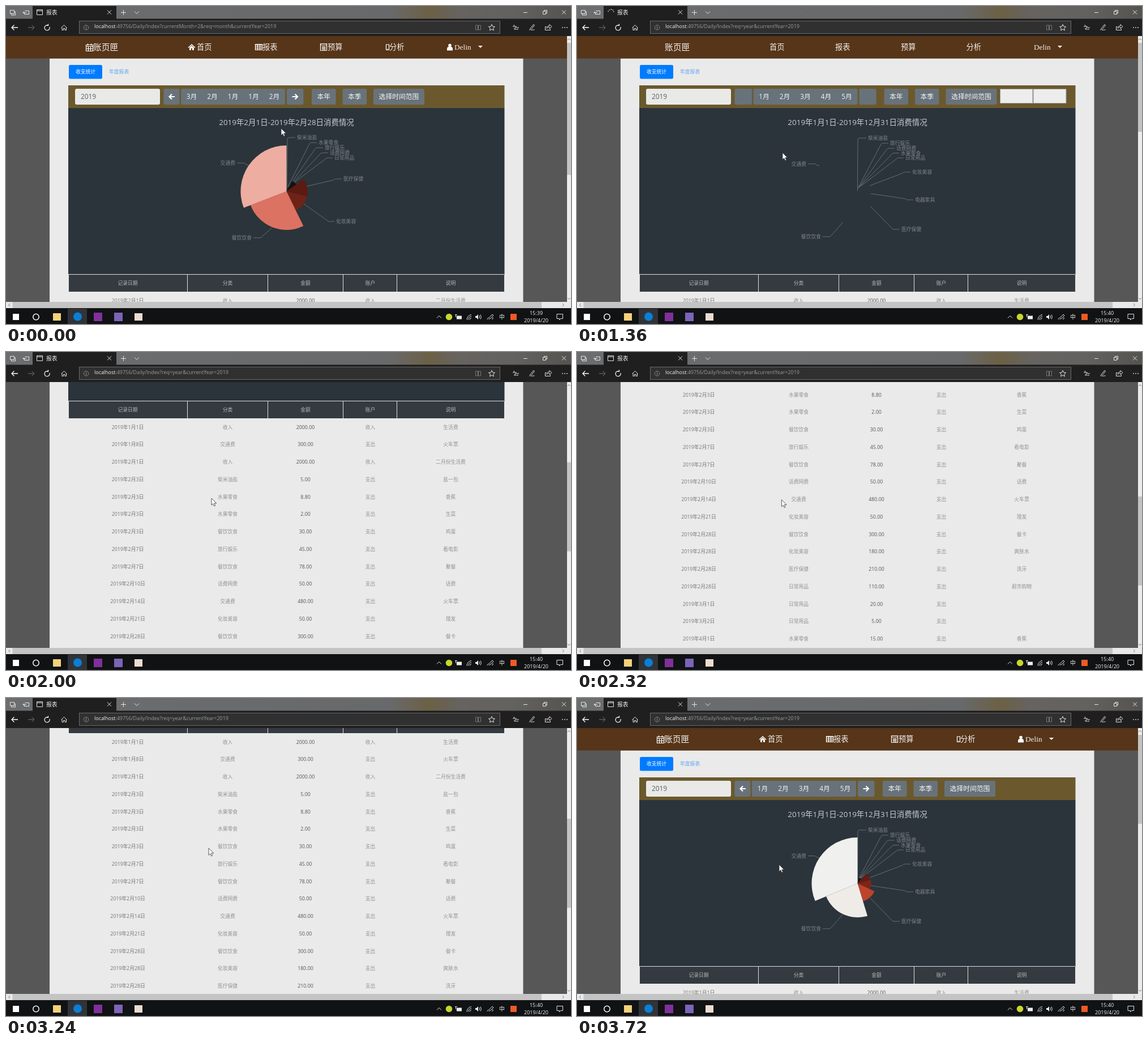
Recreate the animation shown at these times as an HTML page. Size 998x561 px, loop 3.76 s.

```html
<!DOCTYPE html>
<html lang="zh-CN">
<head>
<meta charset="utf-8">
<style>
html, body { margin: 0; width: 100%; height: 100%; overflow: hidden; background: #575757; }
svg { display: block; width: 998px; height: 561px; }
text { font-family: "Open Sans", "Noto Sans", "Noto Sans CJK SC", "Noto Sans CJK", sans-serif; white-space: pre; }
.serif { font-family: "Liberation Serif", serif; }
.line { fill: none; stroke: #e4e4e4; stroke-width: 1; }
</style>
</head>
<body>
<svg id="stage" viewBox="0 0 998 561"></svg>
<script>
const LOOP = 3760;
const stage = document.getElementById('stage');

const rect = (x, y, w, h, fill, rx = 0, extra = '') =>
  `<rect x="${x}" y="${y}" width="${w}" height="${h}" fill="${fill}" rx="${rx}" ${extra}/>`;
const circle = (x, y, r, fill, extra = '') => `<circle cx="${x}" cy="${y}" r="${r}" fill="${fill}" ${extra}/>`;
const line = (d, extra = '') => `<path class="line" d="${d}" ${extra}/>`;
const shape = (d, fill = '#fff') => `<path d="${d}" fill="${fill}"/>`;
const text = (x, y, s, size, fill, anchor = 'start', extra = '') =>
  `<text x="${x}" y="${y + size * .36}" font-size="${size}" fill="${fill}" text-anchor="${anchor}" ${extra}>${s.replace(/&/g, '&amp;')}</text>`;
const mid = (x, y, s, size, fill) => text(x, y, s, size, fill, 'middle');
const group = (id, body, extra = '') => `<g id="${id}" ${extra}>${body}</g>`;

// Table data: month/day, category, amount, note
const records = `1/1 收入 2000.00 生活费
1/8 交通费 300.00 火车票
2/1 收入 2000.00 二月份生活费
2/3 柴米油盐 5.00 盐一包
2/3 水果零食 8.80 香蕉
2/3 水果零食 2.00 生菜
2/3 餐饮饮食 30.00 鸡蛋
2/7 旅行娱乐 45.00 看电影
2/7 餐饮饮食 78.00 聚餐
2/10 话费网费 50.00 话费
2/14 交通费 480.00 火车票
2/21 化妆美容 50.00 理发
2/28 餐饮饮食 300.00 餐卡
2/28 化妆美容 180.00 爽肤水
2/28 医疗保健 210.00 洗牙
2/28 日常用品 110.00 超市购物
3/1 日常用品 20.00
3/2 日常用品 5.00
4/1 水果零食 15.00 香蕉
4/3 交通费 10.00 打车
4/7 收入 2000.00 生活费
4/7 话费网费 20.00 小手机话费
4/10 日常用品 17.80 湿巾
4/11 电器家具 230.00 吹风
4/11 医疗保健 116.00 眼药水
4/15 水果零食 34.00
4/18 餐饮饮食 100.00 请同学聚餐`.split('\n').map(r => r.split(' '));

const edges = [110, 320, 462, 595, 690, 880];
const centers = [215, 391.5, 529, 643.5, 785.5];

function table(rows) {
  let out = rect(110, 474, 770, 30, '#343a40') + rect(110, 473, 770, 1, '#dfe1e3');
  edges.forEach(x => out += rect(x, 474, 1, 30, '#dfe1e3'));
  ['记录日期', '分类', '金额', '账户', '说明'].forEach((h, i) => out += mid(centers[i], 488.8, h, 8.8, '#b4b7ba'));
  rows.forEach(([date, kind, sum, note = ''], i) => {
    const [m, d] = date.split('/');
    const cells = [`2019年${m}月${d}日`, kind, sum, kind === '收入' ? kind : '支出', note];
    cells.forEach((c, j) => out += mid(centers[j], 519.5 + i * 30.75, c, 8.8, j === 2 ? '#555' : j ? '#929292' : '#757575'));
  });
  return out;
}

// Label: name, text x, y, then leader start and bend
const monthLabels = [
  ['柴米油盐', 514, 232, 496, 320, 498], ['水果零食', 552, 241, 498, 319, 537], ['旅行娱乐', 563, 250, 500, 318, 547],
  ['话费网费', 572, 259, 503, 316, 556], ['日常用品', 580, 268, 508, 312, 565], ['医疗保健', 596, 305, 531, 318, 580],
  ['化妆美容', 583, 380, 526, 349, 568], ['餐饮饮食', 434, 409, 470, 391, 451], ['交通费', 405, 277, 428, 281, 422]];
const yearLabels = [
  ['柴米油盐', 514, 233, 495.5, 326, 497], ['旅行娱乐', 553, 242, 496, 322, 538], ['话费网费', 564, 251, 497, 321, 548],
  ['水果零食', 572, 259.5, 498, 320, 557], ['日常用品', 580, 268, 501, 318, 565], ['化妆美容', 592, 293, 517, 317, 576],
  ['电器家具', 597, 342, 519, 331, 581], ['医疗保健', 573, 394, 518, 353, 557], ['餐饮饮食', 431, 407, 469, 382, 448],
  ['交通费', 405, 278.5, 428, 282, 422]];

const labels = list => list.map(([name, x, y, sx, sy, bx]) => {
  const left = x < 495, end = left ? x + 3 : x - 3, k = left ? 2 : -2;
  return line(`M${sx} ${sy}L${bx + k * .5} ${y + (sy > y ? 2 : -2)}Q${bx} ${y} ${bx - k * 1.5} ${y}H${end}`, 'style="stroke:#757b80;stroke-width:.8"') +
    text(x, y, name, 8.8, '#7f858a', left ? 'end' : 'start');
}).join('');

// Slice: start angle, end angle (clockwise from top), radius, colour
const monthPie = [[28, 55, 21, '#141212'], [55, 104, 37, '#5c1a11'], [104, 154, 37.5, '#6e2317'],
  [154, 249, 68, '#dc7262'], [249, 360, 81, '#eeada1']];
const yearPie = [[10, 42, 10, '#161313'], [42, 75, 23, '#641c12'], [75, 115, 24, '#7c2618'],
  [115, 163, 33, '#bd432c'], [163, 247.5, 60, '#efece8'], [247.5, 360, 81, '#f0f0ef']];

function pie(slices, grow) {
  if (grow <= 0) return '';
  const at = (a, r) => `${495.5 + r * Math.sin(a * Math.PI / 180)} ${327 - r * Math.cos(a * Math.PI / 180)}`;
  return slices.map(([a, b, r, c]) =>
    shape(`M495.5 327L${at(a, r)}A${r} ${r} 0 0 1 ${at(a + (b - a) * grow, r)}Z`, c)).join('');
}

function navIcons() {
  const w = 'style="stroke:#fff;stroke-width:1.2"';
  return line('M141.5 68.5h12v11h-12zM141.5 71.5h12M145.5 71.5v8M149.5 71.5v8M141.5 75.5h12M144.5 66v4M150.5 66v4', w) +
    shape('M321.5 73l6.5-6 6.5 6-1 1-5.5-5-5.5 5zM324 73.5l4-3.6 4 3.6v4.5h-3v-3.5h-2v3.5h-3z') +
    line('M440.5 67.5h12v10h-12zM440.5 69h12M440.5 72h12M440.5 75h12M444.5 68v9M448.5 68v9', w) +
    line('M555.5 66.5h11v12h-11zM555.5 69h11M557.5 72.5h7M557.5 75.5h7M560 71v7M563 71v7', w) +
    line('M671.5 68h5v9.5h-5zM673 76h2', w) +
    circle(784, 69.5, 2.8, '#fff') + shape('M779 78.5v-2.5q0-4 3-4h4q3 0 3 4v2.5z');
}

function nav(icons) {
  const xs = icons ? [154, 337, 453, 568, 677, 792] : [155, 340, 456, 572, 687.5, 807];
  const names = ['账页匣', '首页', '报表', '预算', '分析'];
  const caret = icons ? 834 : 849;
  return rect(0, 53, 991, 39.5, '#563519') + (icons ? navIcons() : '') +
    names.map((n, i) => text(xs[i], 72.5, n, i ? 13.3 : 14.8, '#f4f1ee')).join('') +
    text(xs[5], 72.5, 'Delin', 13.3, '#f4f1ee', 'start', 'class="serif"') +
    shape(`M${caret} 70h8l-4 4z`);
}

function button(x, w, label, size = 11.8) {
  return rect(x, 146, w, 28, '#68727a', 2.5) + (label ? mid(x + w / 2, 160, label, size, '#f5f5f5') : '');
}

function toolbar(months, icons) {
  const s = icons ? 0 : 2.5;
  let out = rect(110, 140, 770.5, 40, '#6b592d') +
    rect(122, 146, 150, 28, '#e9e9e8', 3) + text(132, 160, '2019', 11.8, '#5a5e62') +
    button(278.5, icons ? 28 : 30.5) + button(309 + s, 184) + button(496 + s, icons ? 29.5 : 30) +
    button(540 + s, 42.5, '本年') + button(594 + s + .5, 42.5, '本季') + button(648 + s + 1, 90, '选择时间范围');
  months.forEach((m, i) => out += mid(328 + s + i * 36.5, 160, m + '月', 11.8, '#f5f5f5'));
  if (icons) {
    const w = 'style="stroke:#fff;stroke-width:2.2"';
    out += line('M298 160h-9M293 155.5l-4.5 4.5 4.5 4.5', w) + line('M505.5 160h9M510.5 155.5l4.5 4.5-4.5 4.5', w);
  } else {
    out += rect(747.5, 146.5, 57.5, 25, '#ededed', 0, 'stroke="#999"') + rect(806, 146.5, 58, 25, '#ededed', 0, 'stroke="#999"');
  }
  return out;
}

function page(year, icons) {
  const range = year ? '2019年1月1日-2019年12月31日' : '2019年2月1日-2019年2月28日';
  return rect(77, 92.5, 836.5, 1400, '#eaeaea') + nav(icons) +
    rect(111, 104, 59, 24.5, '#007bff', 2.5) + mid(140.5, 116, '收支统计', 8.8, '#fff') +
    text(182, 116, '年度报表', 8.8, '#61a8f2') +
    toolbar(year ? [1, 2, 3, 4, 5] : [3, 2, 1, 1, 2], icons) +
    rect(110, 180, 770.5, 294, '#2b343b') + mid(495.5, 205, range + '消费情况', 13.45, '#c9cccf') +
    labels(year ? yearLabels : monthLabels) + table(year ? records : records.slice(2, 3));
}

function browser() {
  const dim = 'style="stroke:#777"';
  return `<defs><linearGradient id="bar"><stop offset="0" stop-color="#6b6d6f"/><stop offset=".68" stop-color="#68696a"/>
    <stop offset=".75" stop-color="#6c6045"/><stop offset=".8" stop-color="#666360"/>
    <stop offset=".9" stop-color="#636260"/><stop offset="1" stop-color="#555350"/></linearGradient>
    <clipPath id="view"><rect y="53" width="991" height="469"/></clipPath></defs>` +
    rect(0, 0, 998, 23, 'url(#bar)') + rect(47, 0, 148, 23, '#1f1f1f') + rect(0, 22.5, 998, 30.5, '#1f1f1f') +
    line('M7.5 7.5h7v6h-7zM9.5 13.5v2.5h7v-6h-2M33.5 8.5h7v6h-8v-3M36 11.5h-6M32 9.5l-2 2 2 2') +
    text(71, 11, '报表', 9.8, '#eee') +
    line('M179 7.5l7 7M186 7.5l-7 7M203 11.5h9M207.5 7v9M227 9.5l4 4 4-4M914 11.5h7M948.5 9.5h5v5h-5zM950.5 9v-1.5h5v5h-1.5M982 7.5l7 7M989 7.5l-7 7') +
    line('M21 38H10M14.5 33.5L10 38l4.5 4.5', 'style="stroke:#fff;stroke-width:1.3"') +
    line('M39 38h11M45.5 33.5l4.5 4.5-4.5 4.5', dim) +
    line('M97.5 38.5l5-5 5 5M99 37.5v5h2.5v-3h2.5v3h2.5v-5') +
    rect(129.5, 26.5, 743, 22, '#303030', 0, 'stroke="#6a6a6a"') +
    line('M829.5 34h4v8h-4zM834.5 34h4v8h-4z', dim) +
    line('M858 32.5l1.6 3.6 3.9.4-2.9 2.6.8 3.9-3.4-2-3.4 2 .8-3.9-2.9-2.6 3.9-.4z') +
    line('M897 33l1.3 3 3.2.3-2.4 2.1.7 3.2-2.8-1.6M901 38h5M901 41h4M895 36h3') +
    group('tools', line('M924 42.5c3-1 1-3 3-4l5-6 1.5 1.5-5 6c-1 1-2 2-1 2.5s3-1 6-.5M954.5 36.5h-2v6h9v-2M955 39.5c0-3 2-4.5 5-4.5v-2.5l4 4-4 3.5V37.5c-2 0-3.5 0-5 2')) +
    [983, 987, 991].map(x => circle(x, 38, .9, '#ddd')).join('');
}

function taskbar() {
  return rect(0, 533, 998, 28, '#101214') + rect(109, 534, 34, 27, '#303438') +
    rect(12, 543, 11, 11, '#fff') + circle(53, 548.5, 5.2, 'none', 'stroke="#fff" stroke-width="1.5"') +
    rect(83, 542, 14, 13, '#f5d27a') + circle(126.5, 548, 7.5, '#0a7fd6') + rect(155, 541, 15, 15, '#80309b') +
    rect(191, 541, 15, 15, '#7c64b8') + rect(227, 542, 14, 13, '#ecdcd0') +
    line('M761 550.5l4-4 4 4') + circle(782.5, 548.5, 5.8, '#c9d62b') +
    rect(796, 546.5, 9, 6, '#eee') + line('M794.5 544v5M797 544.5h-4') +
    line('M814 553.5a9 9 0 0 1 8-9M816.5 553.5a6 6 0 0 1 5.5-6M819 553.5a3 3 0 0 1 3-3') +
    shape('M829 547h2l3-3v9l-3-3h-2z', '#eee') + line('M836 546q1.5 2.5 0 5M838 544.5q3 4 0 8') +
    line('M850 553c1-4 3-2 4-4l5-5 2 2-5 5c-2 1-3 0-3 2M858 552c3 1 3-2 1-3') +
    mid(876, 548, '中', 10, '#eee') + rect(891, 543, 11, 11, '#ee5a24') +
    mid(936.5, 554.5, '2019/4/20', 9.1, '#f2f2f2') +
    line('M973 543.5h10.5v8h-4l-2 2.5v-2.5H973z');
}

stage.innerHTML = rect(0, 0, 998, 561, '#575757') + browser() +
  line('M77 36a4.6 4.6 0 1 1-3-3M74.5 30.5v3h-3', 'id="reload" style="stroke:#fff;stroke-width:1.2" transform="translate(0 1)"') +
  line('M69.5 34l8 8M77.5 34l-8 8', 'id="stop" style="stroke:#fff"') +
  group('tabIcon', line('M54.5 6.5h10v9h-10zM54.5 8.5h10')) + group('dots', '') +
  circle(141.5, 38, 4.2, 'none', 'stroke="#888"') +
  line('M141.5 37v3.5M141.5 35v1', 'id="info" style="stroke:#999"') +
  line('M137.5 38h8M141.5 34c-3 2.5-3 5.5 0 8c3-2.5 3-5.5 0-8', 'id="globe" style="stroke:#999"') +
  `<text x="156" y="39.2" font-size="8.93" fill="#9b9b9b"><tspan fill="#f2f2f2">localhost</tspan><tspan id="url"></tspan></text>` +
  `<g clip-path="url(#view)"><g id="scroll">` +
  group('month', page(false, true)) + group('bare', page(true, false)) + group('full', page(true, true)) +
  group('hover', rect(538.5, 144.5, 45.5, 31, '#505a61', 3.5, 'stroke="#747b7f" stroke-width="1.5"') + mid(561, 160, '本年', 11.8, '#fff')) +
  group('pie', '') + `</g></g>` +
  rect(991, 53, 7, 469, '#ececec') + rect(991, 65, 7, 157, '#c3c3c3', 0, 'id="thumb"') +
  line('M992 60l2.5-2.5 2.5 2.5M992 515l2.5 2.5 2.5-2.5', 'style="stroke:#777"') +
  rect(0, 522, 998, 11, '#e9e9e9') + rect(11.5, 522, 934.5, 11, '#c4c4c4') +
  line('M7 525l-2.5 2.5 2.5 2.5M983 525l2.5 2.5-2.5 2.5', 'style="stroke:#777"') +
  group('status', rect(1.5, 514.5, 254.5, 17, '#242424', 0, 'stroke="#555"') +
    text(5, 523, 'http://localhost:49756/Daily/Index?req=year&currentYear=2019', 8.4, '#f2f2f2')) +
  taskbar() + `<text id="clock" x="936.5" y="545.3" font-size="9.1" fill="#f2f2f2" text-anchor="middle"></text>` +
  group('arrow', '<path d="M0 0v12.2l2.8-2.6 1.9 4.3 2-.9-1.900-4.2h3.9z" fill="#fff" stroke="#333" stroke-width=".8"/>') +
  group('hand', '<path d="M-1 0q1.5-1.5 2.5.5v4.5l6 1.5q1.5.5 1.3 3l-1 5.5h-7.3q-2-3-4.500-5.500q.5-2 3 0z" fill="#fff" stroke="#333" stroke-width=".8"/>');

const $ = id => document.getElementById(id);
const show = (id, on) => $(id).style.display = on ? '' : 'none';

// Piecewise linear track of [time, ...values]
function track(keys, t) {
  const i = keys.findIndex(k => k[0] > t);
  if (i < 0) return keys[keys.length - 1].slice(1);
  if (i === 0) return keys[0].slice(1);
  const a = keys[i - 1], b = keys[i], p = (t - a[0]) / (b[0] - a[0]);
  return a.slice(1).map((v, j) => v + (b[j + 1] - v) * p);
}

const pointer = [[0, 486, 216], [120, 488, 214], [480, 566, 172], [720, 566, 172], [1200, 363, 259], [2000, 363, 258],
  [2800, 359, 264.5], [3240, 358, 265], [3480, 358, 266], [3720, 357, 294]];
const wheel = [[1680, 0], [2000, 386], [2720, 793], [2880, 793], [3240, 443], [3560, 0]];

function draw(t) {
  const year = t >= 1280, bare = year && t < 1440, hover = t >= 460 && t < 760;
  const loading = t >= 560 && t < 1280, busy = t >= 560 && t < 1440;
  const y = Math.round(track(wheel, t)[0]);
  show('month', !year); show('bare', bare); show('full', year && !bare);
  show('hover', hover); show('status', hover);
  show('reload', !loading); show('stop', loading);
  show('info', !loading); show('globe', loading);
  show('tabIcon', !busy); show('dots', busy);
  show('arrow', !hover); show('hand', hover);
  $('tools').setAttribute('opacity', loading ? .5 : 1);
  $('scroll').setAttribute('transform', `translate(0 ${-y})`);
  $('thumb').setAttribute('y', 65 + y * .335);
  $('thumb').setAttribute('height', year ? 157 : 233);
  $('url').textContent = ':49756/Daily/Index?' + (year ? 'req=year' : 'currentMonth=2&req=month') + '&currentYear=2019';
  $('clock').textContent = t < 1100 ? '15:39' : '15:40';
  const grow = Math.min(1, Math.max(0, (t - 1380) / 280));
  $('pie').innerHTML = year ? pie(yearPie, 1 - (1 - grow) ** 3) : pie(monthPie, 1);
  if (busy) $('dots').innerHTML = [0, 1, 2, 3, 4].map(i => {
    const a = t / 110 - i * .65;
    return circle(60 + 5 * Math.cos(a), 11 + 5 * Math.sin(a), .9, '#ccc');
  }).join('');
  const [px, py] = track(pointer, t);
  $(hover ? 'hand' : 'arrow').setAttribute('transform', `translate(${px} ${py})`);
}

function tick() {
  draw(performance.now() % LOOP);
  requestAnimationFrame(tick);
}
tick();
</script>
</body>
</html>
```
